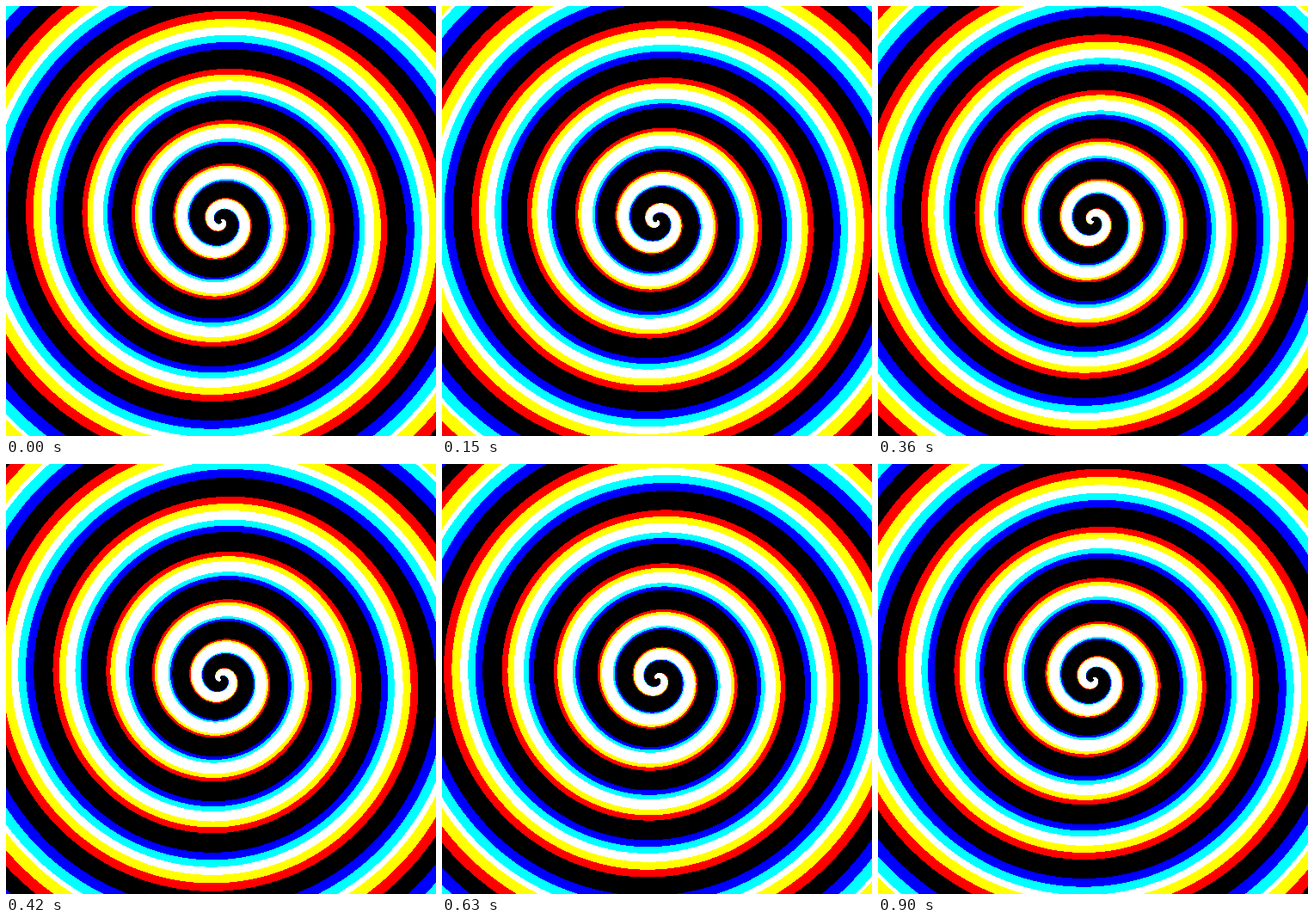
These frames come from a looping animation (500 by 500 pixels, 0.93 s). An HTML page with a canvas:

```html
<!DOCTYPE html>
<html lang="en">
<head>
<meta charset="utf-8">
<title>Spiral</title>
<style>
html, body { margin: 0; width: 100%; height: 100%; overflow: hidden; background: #000; }
canvas { display: block; width: 500px; height: 500px; }
</style>
</head>
<body>
<canvas id="stage" width="500" height="500"></canvas>
<script>
const SIZE = 500, STEP_MS = 30, STEPS = 31;
const TURN = 7.557;                   // growth of r^(2/3) per full turn
const START = 1.17;                   // phase of the outer edge, in turns
const ARM = 0.405;                    // lit share of each turn
const SCALES = [1, 0.962, 0.923];     // spiral size for red, green, blue

const ctx = document.getElementById('stage').getContext('2d');
const image = ctx.createImageData(SIZE, SIZE);
const pixels = image.data.fill(255);

// Resting phase of every colour channel, laid out like the pixel data
const phase = new Float32Array(pixels.length);
for (let y = 0, p = 0; y < SIZE; y++) {
  for (let x = 0; x < SIZE; x++, p += 4) {
    const dx = x + 0.5 - SIZE / 2, dy = y + 0.5 - SIZE / 2;
    const angle = Math.atan2(dx, -dy) / (2 * Math.PI);
    const r = Math.hypot(dx, dy);
    SCALES.forEach((scale, c) => {
      phase[p + c] = START + angle - Math.pow(r / scale, 2 / 3) / TURN;
    });
  }
}

function draw(step) {
  const spin = step / (STEPS - 1);
  for (let p = 0; p < phase.length; p += 4) {
    for (let c = p; c < p + 3; c++) {
      const v = phase[c] - spin;
      pixels[c] = v - Math.floor(v) < ARM ? 255 : 0;
    }
  }
  ctx.putImageData(image, 0, 0);
}

let shown = -1;
function tick() {
  const step = Math.floor(performance.now() / STEP_MS) % STEPS;
  if (step !== shown) draw(shown = step);
  requestAnimationFrame(tick);
}
tick();
</script>
</body>
</html>
```
